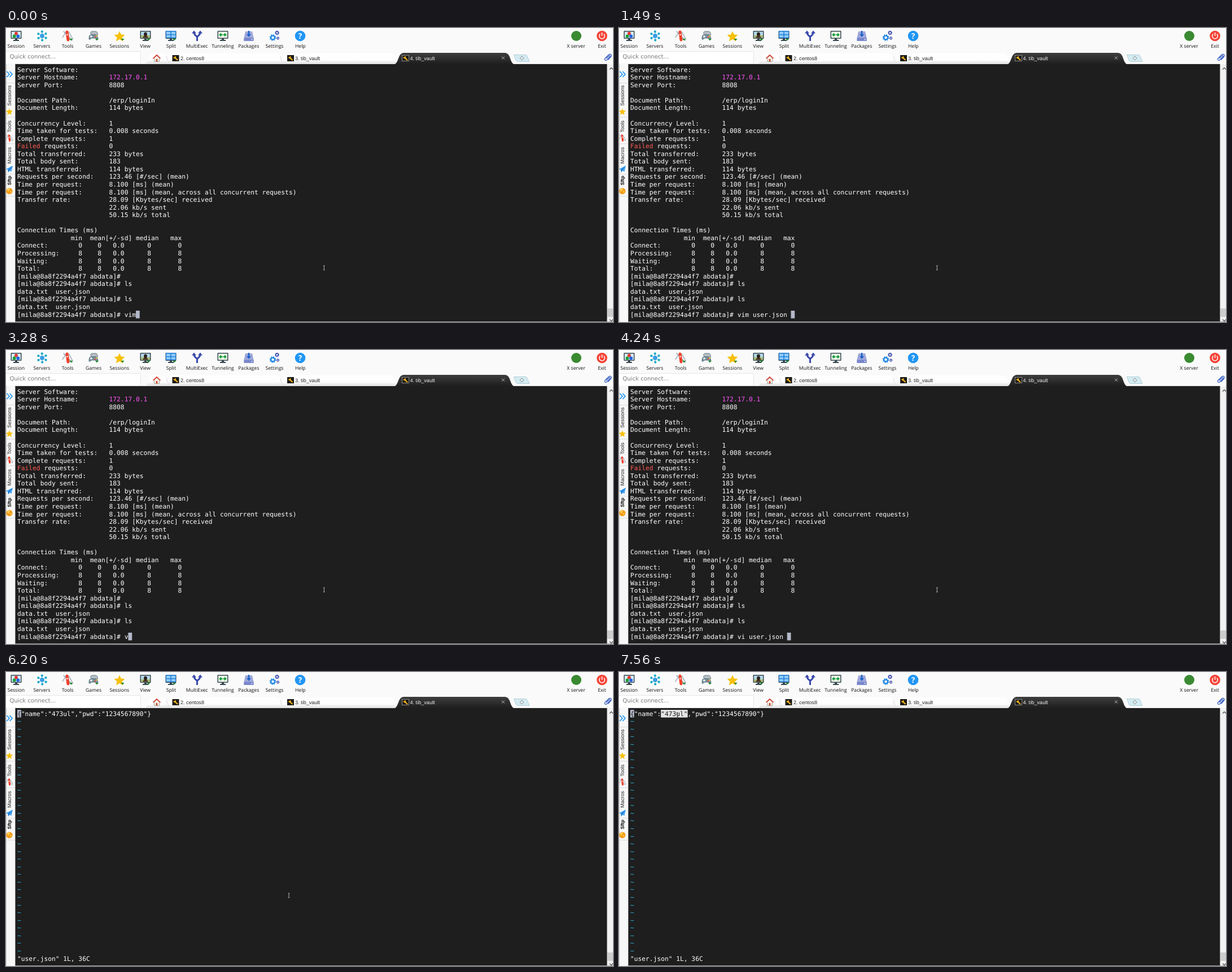
These frames come from a looping animation (1075 by 521 pixels, 8 s). An HTML page:

```html
<!DOCTYPE html>
<html lang="en">
<head>
<meta charset="utf-8">
<title>Terminal session</title>
<style>
  html, body { margin: 0; width: 100%; height: 100%; overflow: hidden; background: #fafafa; }
  svg { display: block; width: 1075px; height: 521px; }
  text { white-space: pre; text-rendering: geometricPrecision; }
  .term { font: 11.25px "DejaVu Sans Mono", monospace; fill: #fff; }
  .tool { font: 8.65px "Open Sans", sans-serif; fill: #111; text-anchor: middle; }
  .tab { font: 9.1px "Liberation Sans", sans-serif; fill: #222; }
  .side { font: 9px "Liberation Sans", sans-serif; fill: #222; }
  .quick { font: 10.1px "DejaVu Sans", sans-serif; fill: #777; }
</style>
</head>
<body>
<svg viewBox="0 0 1075 521" xmlns="http://www.w3.org/2000/svg">
  <defs>
    <linearGradient id="dark" x1="0" y1="0" x2="0" y2="1">
      <stop offset="0" stop-color="#3e3e3e"/><stop offset="1" stop-color="#1e1e1e"/>
    </linearGradient>
    <linearGradient id="pale" x1="0" y1="0" x2="0" y2="1">
      <stop offset="0" stop-color="#fff"/><stop offset=".65" stop-color="#fdfdfd"/><stop offset="1" stop-color="#e2e2e2"/>
    </linearGradient>
    <path id="drop" d="M0 0h6l-3 3.4z" fill="#1d8a2c"/>
    <path id="star" d="M0-9.5 2.8-3.4 9.5-2.8 4.5 1.8 6 8.5 0 5-6 8.5-4.5 1.8-9.5-2.8-2.8-3.4z" fill="#f7c00a"/>
    <g id="monitor">
      <rect x="-9.5" y="-9" width="19" height="14" rx="1" fill="#37474f"/>
      <path d="M-2 5h4v2h3v2H-5V7h3z" fill="#37474f"/>
    </g>
    <g id="knife" stroke-linecap="round" fill="none">
      <path d="M-3-5-7.5 2M2-6 8 5" stroke="#b4bec6" stroke-width="1.8"/>
      <path d="M-6-7 7 7" stroke="#90a4ae" stroke-width="1.3"/>
      <path d="M-.8-6 .8 6" stroke="#f0402c" stroke-width="4.4"/>
      <path d="M-1.5-2h2M-.5-3v2" stroke="#fff" stroke-width=".9"/>
    </g>
    <g id="gear" fill="none">
      <circle r="4.2" stroke-width="2.8"/>
      <circle r="6" stroke-width="2.2" stroke-dasharray="2.36 2.36"/>
    </g>
    <g id="wrench">
      <rect width="12" height="11" fill="#1d1b16"/>
      <path d="M4 4 9.5 9" stroke="#f4b51e" stroke-width="2.2"/>
      <path d="M2.2 3.2A2.3 2.3 0 1 0 5 1.7L4.3 3.7z" fill="#f4b51e"/>
    </g>
  </defs>

  <!-- toolbar -->
  <rect width="1075" height="64" fill="#fafafa"/>
  <g id="labels"></g>
  <g transform="translate(18 14)"><use href="#monitor"/>
    <path d="M-8-7.5H8v11H-8z" fill="#d6efff"/>
    <circle cy="-4.2" r="3" fill="#e53935"/><circle cx="-3.3" cy=".6" r="3" fill="#21a038"/><circle cx="3.3" cy=".6" r="3" fill="#2464e0"/>
  </g>
  <g id="net" transform="translate(64 14)"><circle r="3.7" fill="#1e88e5"/></g>
  <use href="#knife" transform="translate(109 14) scale(1.15)"/>
  <g transform="translate(155 14)" stroke="#546e7a" stroke-width=".9">
    <path d="M-5-4Q-6-8-2-8H4Q7-8 7.5-2 6 1 4-2H-3z" fill="#b8c0c6"/>
    <path d="M-5-2H4Q7-2 8 5.500 6.500 8 4 4H-4Q-7 8-8 5.500-8-2-5-2z" fill="#78909c"/>
    <path d="M-6 1h4M-4-1v4" stroke="#fff" stroke-width="1.300"/>
    <g stroke="none"><circle cx="3" cy="2" r="1.200" fill="#f44336"/><circle cx="5.200" cy=".3" r="1.200" fill="#ffca28"/></g>
  </g>
  <use href="#star" x="201" y="15"/>
  <g transform="translate(247 14)"><use href="#monitor"/>
    <path d="M-8-7.5H8v11H-8z" fill="#b3d9ea"/><path d="M-8-1H8v4.5H-8z" fill="#a8ba70"/>
    <path d="M-5 3.5Q-4 .5-2 0h4Q4 .5 5 3.5z" fill="#4a3326"/><ellipse cy="-3" rx="3" ry="3.600" fill="#2d211b"/>
  </g>
  <g transform="translate(292 14)"><use href="#monitor"/>
    <path d="M-9-9H9V4H-9z" fill="#1976d2"/><path d="M-8-7.5h7.3v4.8H-8zM.7-7.5H8v4.8H.7zM-8-1.5h7.3v4.3H-8zM.7-1.5H8v4.3H.7z" fill="#90cdfa"/>
  </g>
  <g transform="translate(338.5 14)">
    <path d="M0 9V3Q0 1-3-1-5.5-3-5.5-7M0 3Q0 1 3-1 5.5-3 5.5-7" fill="none" stroke="#3949ab" stroke-width="3"/>
    <path d="M-9.5-4.5-5.5-9.5-1.5-4.5zM9.5-4.5 5.5-9.5 1.5-4.5z" fill="#3949ab"/>
  </g>
  <g transform="translate(384 14)"><use href="#monitor"/>
    <path d="M-8-7.5H8v11H-8z" fill="#eef8e8"/>
    <path d="M-7-2-3-5.5v2.3H-.7v2.4H-3v2.3zM7-2 3-5.5v2.3H.7v2.4H3v2.3z" fill="#169c3c"/>
  </g>
  <g transform="translate(430 14)">
    <path d="M-6-8H6L8.5 3V9h-17V3z" fill="#9fa8da"/><path d="M-8.5 3.5h17V9h-17z" fill="#7986cb"/>
    <path d="M-1.3-9h2.6v6H4L0 2-4-3h2.7z" fill="#1e63c8"/><circle cx="5.5" cy="6.3" r="1" fill="#fff"/>
  </g>
  <use href="#gear" transform="translate(472.5 17) scale(.82)" stroke="#1e88e5"/>
  <use href="#gear" transform="translate(480 8.5) scale(.55)" stroke="#3949ab"/>
  <use href="#gear" transform="translate(481.5 18) scale(.4)" stroke="#3949ab"/>
  <circle cx="521" cy="14" r="9.3" fill="#2196f3"/>
  <text x="521" y="18.9" text-anchor="middle" fill="#fff" style="font:bold 13.5px 'Open Sans',sans-serif">?</text>
  <circle cx="1010" cy="14" r="9" fill="#3a8a32"/>
  <circle cx="1055.5" cy="14" r="9.3" fill="#f44336"/>
  <path d="M1052.3 10.5a4.8 4.8 0 1 0 6.4 0M1055.5 8v6" fill="none" stroke="#fff" stroke-width="1.5"/>
  <g id="drops"></g>

  <!-- quick connect and tabs -->
  <path d="M0 41.5H238.5V63" fill="none" stroke="#e6e6e6"/>
  <rect y="42" width="238" height="20" fill="#fff"/>
  <text class="quick" x="6.5" y="53.6">Quick connect...</text>
  <g fill="url(#pale)">
    <path d="M247 63Q251 61 253 53 255 45 260 45H277Q282 45 284 53 286 60 290 63z"/>
    <path d="M284 63Q288 61 288 53 288 45 294 45H479Q484 45 486 53 487 60 491 63z"/>
    <path d="M488 63Q491 61 491 53 492 45 498 45H681Q686 45 688 53 689 60 693 63z"/>
  </g>
  <path d="M16 63.5H1064" stroke="#e6e6e6"/>
  <path d="M284 50Q286 59 290 62M486 50Q487 59 491 62" fill="none" stroke="#d4d4d4" stroke-width=".8"/>
  <path d="M689 64Q692 62 694.5 55 698 44 704 44H884Q890 44 893 54 895.5 62 899 64z" fill="url(#dark)"/>
  <g transform="translate(267 54)">
    <path d="M-4.5-1V5.5h9V-1L0-5z" fill="#f6f1e4" stroke="#888" stroke-width=".7"/>
    <path d="M-6.5 0 0-6 6.5 0" fill="none" stroke="#d6372c" stroke-width="1.7"/><path d="M-1.4 1h2.8v4.5h-2.8z" fill="#c54c34"/>
  </g>
  <use href="#wrench" x="294.5" y="48"/><use href="#wrench" x="498" y="48"/>
  <use href="#wrench" x="701.5" y="48"/><rect x="701.5" y="48.5" width="12" height="10" fill="none" stroke="#b9b9b9" stroke-width=".7"/>
  <text class="tab" x="309" y="56.5">2. centos8</text>
  <text class="tab" x="512" y="56.5">3. tib_vault</text>
  <text class="tab" x="715.5" y="56.5" style="fill:#f0f0f0">4. tib_vault</text>
  <path d="m878 50.5 5 5m0-5-5 5" stroke="#c8c8c8" stroke-width=".9"/>
  <path d="M899.5 47.5H920Q922 47.5 923 50L927 59.5H907Q904 59.5 903 57z" fill="#d4ebf2" stroke="#a5c6d0" stroke-width=".8"/>
  <path d="M910 53.5h7m-3.5-3.5v7" stroke="#8c9ea6" stroke-width="3"/><path d="M911 53.5h5m-2.5-2.5v5" stroke="#fff" stroke-width="1.4"/>
  <path d="m1063 54 5-5q2-1 2.2 1l-6 6.5q-3 2-4-1 0-1 1-2l6-6q3-2.5 5 .5 0 2-1 3l-5 5.5" fill="none" stroke="#3058c0" stroke-width="1.2"/>

  <!-- side bar -->
  <rect y="64" width="17" height="457" fill="#f7f7f7"/>
  <path d="M.5 64V521" stroke="#cfcfcf"/>
  <path d="M0 97.5H16M0 158H16M0 205H16M0 259H16M0 298H16" stroke="#dcdcdc"/>
  <path d="m1.5 77 4.5 5-4.5 5m5-10 4.5 5-4.5 5" fill="none" stroke="#2196f3" stroke-width="1.7"/>
  <use href="#star" transform="translate(6 148.5) scale(.64)"/>
  <use href="#knife" transform="translate(6 195) scale(.75)"/>
  <path d="M12 244 0 250l3.5 1.5L4 256l2.5-3 3 1.8z" fill="#42a5f5"/><path d="M12 244 3.5 251.5 4 256l1.5-4z" fill="#1565c0"/>
  <circle cx="6" cy="289" r="5.6" fill="#f59a13"/><path d="M2 286q3-3 5-1l-1 3-3 2zM7 289l3 0-2 4z" fill="#ffd05a"/>
  <g id="side"></g>

  <!-- terminal -->
  <rect x="1064" y="64" width="11" height="457" fill="#f1f1f1"/>
  <rect x="16.4" y="64" width="1048" height="456" fill="#1e1e1e"/>
  <rect x="16" y="520" width="1059" height="1" fill="#a8a8a8"/>
  <rect x="1065" y="497" width="10" height="15" fill="#cdcdcd"/>
  <path d="m1069 73.5 3-3 3 3M1069 516.5l3 3 3-3" fill="none" stroke="#555" stroke-width="1.3"/>
  <g id="shell" class="term"></g>
  <g id="editor" class="term"></g>
  <path id="mouse" d="M-1.4-3.8H1.4M0-3.8V3.8M-1.4 3.8H1.4" stroke-width=".9" fill="none"/>
</svg>
<script>
const NS = 'http://www.w3.org/2000/svg';
const $ = id => document.getElementById(id);
const LEFT = 20, TOP = 67, CELL = 11.25 * 0.60205, LINE = 13.56, LOOP = 8000;

function add(parent, tag, attrs, text = '') {
  const el = document.createElementNS(NS, tag);
  for (const k in attrs) el.setAttribute(k, attrs[k]);
  el.textContent = text;
  return parent.appendChild(el);
}
const colX = col => LEFT + col * CELL;
const write = (parent, row, col, text, fill) =>
  add(parent, 'text', { x: colX(col), y: TOP + 10.6 + row * LINE, ...(fill && { style: 'fill:' + fill }) }, text);
const block = (parent, row, col, n, fill) =>
  add(parent, 'rect', { x: colX(col), y: TOP + row * LINE, width: n * CELL, height: 13.6, fill });

// toolbar and side bar labels
const tools = ['Session', 'Servers', 'Tools', 'Games', 'Sessions', 'View', 'Split',
  'MultiExec', 'Tunneling', 'Packages', 'Settings', 'Help'];
tools.forEach((name, i) => add($('labels'), 'text', { class: 'tool', x: 17.7 + i * 45.78, y: 35.3 }, name));
add($('labels'), 'text', { class: 'tool', x: 1009.5, y: 35.3 }, 'X server');
add($('labels'), 'text', { class: 'tool', x: 1055.5, y: 35.3 }, 'Exit');
[2, 3, 4, 5, 6].forEach(i => add($('drops'), 'use', { href: '#drop', x: 20.5 + i * 45.78, y: 19 }));
for (let i = 0; i < 6; i++) {
  const a = i * Math.PI / 3 + 0.5, x = 7.6 * Math.cos(a), y = 7.6 * Math.sin(a);
  add($('net'), 'path', { d: `M0 0L${x} ${y}`, stroke: '#4db6e0', 'stroke-width': 0.9 });
  add($('net'), 'circle', { cx: x, cy: y, r: 2.1, fill: '#16a9c4' });
}
[['Sessions', 138], ['Tools', 185], ['Macros', 240.5], ['Sftp', 278.5]].forEach(([name, y], i) =>
  add($('side'), 'text', { class: 'side', transform: `translate(9 ${y}) rotate(-90)`,
    ...(i === 3 && { style: 'font-weight:bold;font-size:8.6px;fill:#000' }) }, name));

// shell screen
const PROMPT = '[mila@8a8f2294a4f7 abdata]# ';
const report = `Server Software:
Server Hostname:
Server Port:            8808

Document Path:          /erp/loginIn
Document Length:        114 bytes

Concurrency Level:      1
Time taken for tests:   0.008 seconds
Complete requests:      1
       requests:        0
Total transferred:      233 bytes
Total body sent:        183
HTML transferred:       114 bytes
Requests per second:    123.46 [#/sec] (mean)
Time per request:       8.100 [ms] (mean)
Time per request:       8.100 [ms] (mean, across all concurrent requests)
Transfer rate:          28.09 [Kbytes/sec] received
                        22.06 kb/s sent
                        50.15 kb/s total

Connection Times (ms)
              min  mean[+/-sd] median   max
Connect:        0    0   0.0      0       0
Processing:     8    8   0.0      8       8
Waiting:        8    8   0.0      8       8
Total:          8    8   0.0      8       8
${PROMPT}
${PROMPT}ls
data.txt  user.json
${PROMPT}ls
data.txt  user.json
${PROMPT}`;
const shell = $('shell'), editor = $('editor'), mouse = $('mouse');
report.split('\n').forEach((line, row) => write(shell, row, 0, line));
write(shell, 1, 24, '172.17.0.1', '#ff55f8');
write(shell, 10, 0, 'Failed', '#ff5c55');
const typed = write(shell, 32, PROMPT.length, '');
const caret = block(shell, 32, 0, 1, '#b3b9c9');

// editor screen
block(editor, 0, 0, 1, '#b3b9c9');
write(editor, 0, 0, '{', '#1e1e1e');
write(editor, 0, 1, '"name":');
const plain = write(editor, 0, 8, '"473ul"');
write(editor, 0, 15, ',"pwd":"1234567890"}');
for (let row = 1; row < 32; row++) write(editor, row, 0, '~', '#2cbce4');
write(editor, 32, 0, '"user.json" 1L, 36C');
const picked = add(editor, 'g', {});
block(picked, 0, 8, 7, '#e4e4e4');
write(picked, 0, 8, '"473ul"', '#1e1e1e');

const typing = [
  [0, 'vim'], [970, 'vim '], [1220, 'vim u'], [1370, 'vim us'], [1490, 'vim user.json '],
  [1920, 'vim user.json'], [2470, 'vim use'], [2630, 'vi'], [2750, ''],
  [3280, 'v'], [3430, 'vi'], [3710, 'vi '], [4110, 'vi u'], [4240, 'vi user.json ']
];
const moves = [
  [0, 563.3, 425], [6200, 501, 396], [6340, 300, 262], [6460, 190.5, 152.7],
  [6610, 127, 108.5], [6735, 113, 90], [6860, 107.8, 79.6], [7010, 106.5, 79], [7160, 103.5, 76]
];
const OPEN = 4920, PICK = 7560;
const at = (steps, t) => steps.findLast(s => s[0] <= t);
const show = (el, on) => el.setAttribute('visibility', on ? 'visible' : 'hidden');

function draw(t) {
  const cmd = at(typing, t)[1], [, x, y] = at(moves, t);
  if (typed.textContent !== cmd) typed.textContent = cmd;
  caret.setAttribute('x', colX(PROMPT.length + cmd.length));
  show(shell, t < OPEN);
  show(editor, t >= OPEN);
  show(picked, t >= PICK);
  show(plain, t >= OPEN && t < PICK);
  mouse.setAttribute('transform', `translate(${x} ${y})`);
  mouse.setAttribute('stroke', t >= PICK ? '#333' : '#c4c4c4');
}
const start = performance.now();
function tick() {
  draw((performance.now() - start) % LOOP);
  requestAnimationFrame(tick);
}
draw(0);
tick();
</script>
</body>
</html>
```
